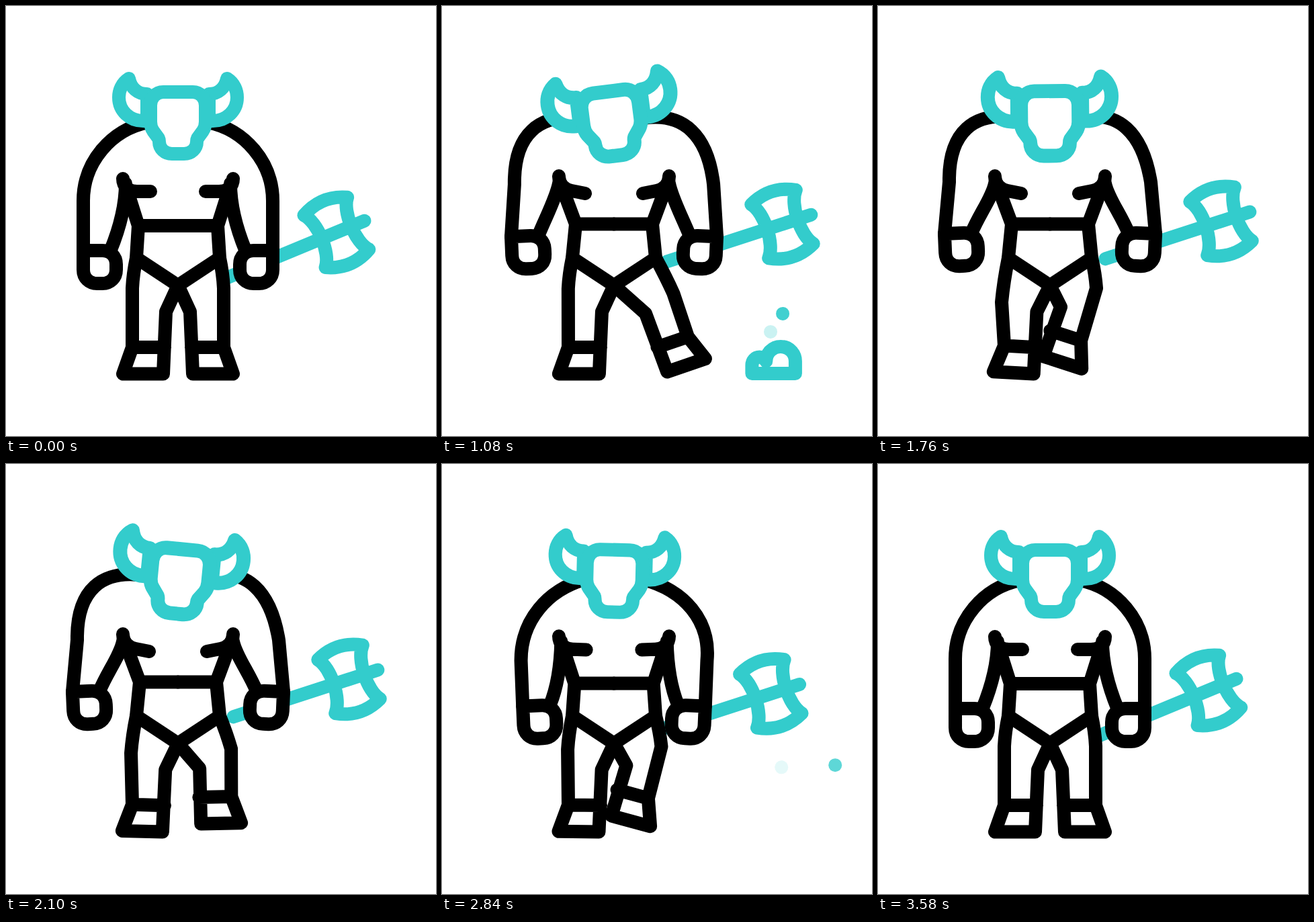
Write an HTML page that moves like this. It is 640 by 640 pixels and loops after 3600 ms.

```html
<!DOCTYPE html>
<html lang="en">
<head>
<meta charset="utf-8">
<title>Walking minotaur</title>
<style>
  html, body { margin: 0; width: 100%; height: 100%; overflow: hidden; background: #fff; }
  svg { display: block; width: 100vw; height: 100vh; fill: none; stroke-width: 20; stroke-linecap: round; stroke-linejoin: round; }
</style>
</head>
<body>
<svg viewBox="0 0 640 640"></svg>
<script>
const LOOP = 3600;
const STEP = 600;
const TEAL = '#33cccc';
const MIRROR = 'transform="matrix(-1 0 0 1 512 0)"';
const svg = document.querySelector('svg');

const clamp = k => Math.max(0, Math.min(1, k));
const smooth = k => k * k * (3 - 2 * k);
const cubic = k => k < .5 ? 4 * k ** 3 : 1 - 4 * (1 - k) ** 3;
const mix = (a, b, k) => a + (b - a) * k;
const mixPose = (a, b, k) => a.map((v, i) => mix(v, b[i], k));
const path = d => `<path d="${d}"/>`;

// Eased value at time t from [[time, value], ...].
function track(t, keys) {
  const next = keys.findIndex(key => key[0] > t);
  if (next < 0) return keys[keys.length - 1][1];
  const [t0, from] = keys[next - 1], [t1, to] = keys[next];
  return mix(from, to, smooth((t - t0) / (t1 - t0)));
}

// Point (u, v) of a part that sits at (x, y) and is turned by some degrees.
function placed(x, y, degrees, u, v) {
  const a = degrees * Math.PI / 180;
  return [x + u * Math.cos(a) - v * Math.sin(a), y + u * Math.sin(a) + v * Math.cos(a)];
}

const FIST = 'M-24.5-24.5V4C-24.5 16-16 24.5-4 24.5H4C16 24.5 24.5 16 24.5 4V-4C24.5-16 16-24.5 4-24.5Z';
const HORN = path('M183 108C172 115 168 126 168 136C168 156 184 171 204 171H210V131C196 131 186 122 183 108Z');
const SKULL = path('M215 148C215 137 223 128 234 128H278C289 128 297 137 297 148V172Q297 180 293 186L285 197Q284 199 284 202C284 212 276 220 265 220H247C236 220 228 212 228 202Q228 199 227 197L219 186Q215 180 215 172Z');
const AXE = path('M-51-2H175M95-44C110-27 110 23 95 40Q130 58 165 40C150 23 150-27 165-44Q130-62 95-44Z');
const CLOUD = 'M-37 0H37V-21A25 25 0 0 0-13-21C-16-26-20-28-24-28C-32-28-37-22-37-14Z';

// The body rises by lift; the arms swing sideways by spread; the grip turns fists and axe.
const fistAt = (lift, spread) => [139.5 - 15 * spread, 388.5 - 17 * lift - 9 * spread ** 2];

function arm(lift, spread, grip, lean) {
  const [x, y] = fistAt(lift, spread);
  const turn = -2.5 * grip;
  const corner = placed(x, y, turn, -24.5, -24.5);
  const [wx, wy] = placed(x, y, turn, 16, -24.5);
  const sway = lean * spread;
  return path(`M212 ${173 - 6 * lift}
      C${156 - 8 * lift + sway} ${184 - 15 * lift - 15 * spread}
      ${115 - 3 * lift + sway} ${233 - 32 * lift - 12 * spread}
      ${115 - 2 * lift - 7 * spread} ${290 - 15 * lift - 13 * spread} L${corner}
      M${178 - 4 * lift} 264 C${178 - 8 * lift} ${300 - 15 * lift} ${wx + 11} ${wy - 27} ${wx} ${wy}`)
    + `<path d="${FIST}" fill="#fff" transform="translate(${x} ${y}) rotate(${turn})"/>`;
}

function axe(lift, spread, grip) {
  const [x, y] = fistAt(lift, spread);
  return `<g stroke="${TEAL}" transform="translate(${512 - x} ${y}) rotate(${-22.5 + 4.5 * grip})">${AXE}</g>`;
}

const halfTorso = lift => path(`M174 ${257 - 4 * lift}
  C174 ${268 - 3 * lift} 182 ${276 - 3 * lift} ${195 - 2 * lift} ${276 - lift} L${215 - 2 * lift} ${276 + 3 * lift}
  M${180 - 2 * lift} ${273 - 5 * lift} L${197 + 2 * lift} ${327 - 2.5 * lift} H256 H${197 + 2 * lift} L194 375 L256 416`);

// Leg pose: outer knee, inner knee, ankle, foot angle
const stand = [324, 420, 274, 455, 324, 508, 0];
const bent = [329, 446, 276, 455, 324, 505, -4];
const back = [325, 420, 272, 448, 302, 498, 18];
const front = [345, 428, 304, 458, 368, 492, -20];
const strides = [stand, back, front, back, front, back, stand];
const bends = [0, 1, 0, .8, 0, .2, 0];

function leg([ox, oy, ix, iy, x, y, turn]) {
  const foot = (u, v) => placed(x, y, turn, u, v);
  return path(`M318 375 Q${ox / 2 + 161} ${oy / 2 + 189} ${ox} ${oy} L${x} ${y} L${foot(14, 39.5)} L${foot(-46, 39.5)}
    L${ix} ${iy} L256 416 M${x} ${y} L${foot(-48, 0)}`);
}

const ramp = (t, a, b, c, d) => clamp(Math.min((t - a) / (b - a), (d - t) / (d - c)));
const puff = (x, y, opacity) => `<circle cx="${x}" cy="${y}" r="10" fill="${TEAL}" opacity="${opacity}"/>`;

// Cloud and three puffs thrown up by each stamp of the foot
function dust(t) {
  const age = t - 1080;
  const size = 1 - .7 * (1 - clamp((t - 960) / 280)) ** 3;
  return `<path d="${CLOUD}" vector-effect="non-scaling-stroke" stroke="${TEAL}" opacity="${ramp(t, 960, 1020, 1280, 1420)}"
      transform="translate(${493.5 + .14 * age} 547) scale(${size})"/>`
    + puff(507 + .075 * age, 458 - .069 * age, ramp(t, 960, 1090, 1300, 1500))
    + puff(489 + .029 * age, 485 - .06 * age, ramp(t, 1050, 1170, 1400, 1675))
    + puff(523.5 + .11 * age, 479 - .055 * age, ramp(t, 1200, 1315, 1620, 1720));
}

function draw() {
  const t = performance.now() % LOOP;
  const lift = track(t, [[0, 0], [600, 1], [2400, 1], [3000, 0]]);
  const spread = track(t, [[0, 0], [600, .4], [1500, 1], [2300, 1], [3000, -.63], [LOOP, 0]]);
  const tilt = track(t, [[0, 0], [1200, -7.5], [2400, 7.9], [3000, 0]]);
  const grow = track(t, [[0, 1], [1200, 1.047], [2400, 1.047], [3000, 1]]);
  const grip = Math.min(1, 2.5 * Math.abs(spread));

  const step = Math.floor(t / STEP), k = cubic(t / STEP % 1);
  const rightLeg = leg(mixPose(strides[step], strides[step + 1], k));
  const leftLeg = leg(mixPose(stand, bent, mix(bends[step], bends[step + 1], k)));
  const half = halfTorso(lift);

  svg.innerHTML = `${axe(lift, spread, grip)}
    <g stroke="#000">
      <g fill="#fff">${rightLeg}<g ${MIRROR}>${leftLeg}</g></g>
      ${half}<g ${MIRROR}>${half}</g>
      ${arm(lift, spread, grip, -7)}<g ${MIRROR}>${arm(lift, spread, grip, 6)}</g>
    </g>
    <g stroke="${TEAL}" fill="#fff"
      transform="translate(256 ${193 + 1.7 * lift}) rotate(${tilt}) scale(${grow}) translate(-256 -193)">
      ${HORN}<g ${MIRROR}>${HORN}</g>${SKULL}
    </g>
    ${dust(t < 1800 ? t : t - 1200)}`;
  requestAnimationFrame(draw);
}
draw();
</script>
</body>
</html>
```
